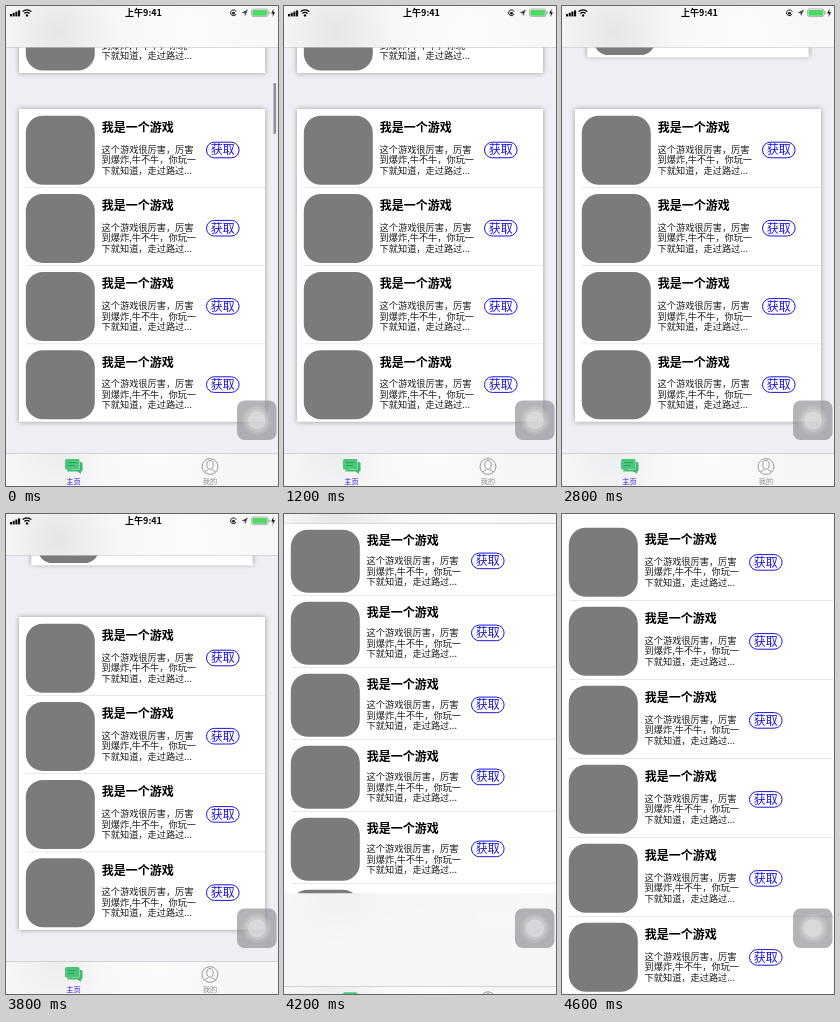
An HTML page with a canvas for the animation above (4800 ms loop, 272x480 px).

```html
<!DOCTYPE html>
<html lang="zh-CN">
<head>
<meta charset="utf-8">
<style>
html, body { margin: 0; width: 100%; height: 100%; overflow: hidden; background: #efeef4; }
canvas { display: block; width: 272px; height: 480px; }
</style>
</head>
<body>
<canvas id="stage"></canvas>
<script>
const W = 272, H = 480, LOOP = 4800, STEP = 200;
const FONT = '"Noto Sans CJK SC", "Noto Sans CJK", sans-serif';
const BLUE = '#1a12e0', ICON = '#7d7a7d', BG = '#efeef4';
const ROW = 78.2;
const BODY = ['这个游戏很厉害，厉害', '到爆炸,牛不牛，你玩一', '下就知道，走过路过...'];

const canvas = document.getElementById('stage');
const dpr = window.devicePixelRatio || 1;
canvas.width = W * dpr;
canvas.height = H * dpr;
const ctx = canvas.getContext('2d');

const lerp = (a, b, k) => a + (b - a) * k;

function rect(x, y, w, h, color) {
  ctx.fillStyle = color;
  ctx.fillRect(x, y, w, h);
}

function round(x, y, w, h, r) {
  ctx.beginPath();
  ctx.roundRect(x, y, w, h, r);
}

function disc(x, y, r, color) {
  ctx.beginPath();
  ctx.arc(x, y, r, 0, Math.PI * 2);
  ctx.fillStyle = color;
  ctx.fill();
}

function poly(points, color) {
  ctx.beginPath();
  points.forEach(([x, y]) => ctx.lineTo(x, y));
  ctx.fillStyle = color;
  ctx.fill();
}

// Soft spot of colour, given as "r,g,b", clipped to a bar.
function glow(x, y, r, rgb, alpha, top, h) {
  const g = ctx.createRadialGradient(x, y, 0, x, y, r);
  g.addColorStop(0, `rgba(${rgb},${alpha})`);
  g.addColorStop(1, `rgba(${rgb},0)`);
  rect(0, top, W, h, g);
}

function text(str, x, y, size, color, weight = 400, align = 'left') {
  ctx.font = `${weight} ${size}px ${FONT}`;
  ctx.textAlign = align;
  ctx.textBaseline = 'alphabetic';
  ctx.fillStyle = color;
  ctx.fillText(str, x, y + size * 0.37);
}

// One game entry; its contents adapt to the row height.
function drawRow(x, y, pitch, right, line) {
  const shift = (pitch - ROW) / 2;
  const iconH = Math.min(69, pitch - 9);
  ctx.fillStyle = ICON;
  round(x + 6.8, y + 6.7, 69, iconH, 17);
  ctx.fill();
  text('我是一个游戏', x + 82.7, y + 18.5 + shift * 0.2, 12, '#000', 700);
  BODY.forEach((s, i) => text(s, x + 82.6, y + 40.2 + i * 10.5 + shift * 0.8, 9.2, '#1c1c1c'));
  const mid = y + 41 + shift;
  ctx.strokeStyle = BLUE;
  ctx.lineWidth = 1;
  round(x + 187.5, mid - 7.8, 32.6, 15.6, 7.8);
  ctx.stroke();
  text('获取', x + 203.8, mid, 12, BLUE, 400, 'center');
  if (line) rect(x + 7, y + pitch, right - x - 7, 0.6, '#d9d9dc');
}

function panel(x, y, w, h) {
  ctx.save();
  ctx.shadowColor = 'rgba(0,0,0,0.36)';
  ctx.shadowBlur = 5 * dpr;
  rect(x, y, w, h, '#fff');
  ctx.restore();
}

function drawCard(top, scale) {
  const h = ROW * 4, cx = 136, cy = top + h / 2;
  ctx.save();
  ctx.translate(cx, cy);
  ctx.scale(scale, scale);
  ctx.translate(-cx, -cy);
  panel(13, top, 246, h);
  for (let i = 0; i < 4; i++) drawRow(13, top + i * ROW, ROW, 259, i < 3);
  ctx.restore();
}

function drawStatus() {
  for (let i = 0; i < 4; i++) rect(4 + i * 2.7, 8 - i * 1.2, 2, 2.4 + i * 1.2, '#000');
  ctx.strokeStyle = '#000';
  ctx.lineWidth = 1.3;
  for (const r of [3.6, 6.2]) {
    ctx.beginPath();
    ctx.arc(21, 10, r, -Math.PI * 0.75, -Math.PI * 0.25);
    ctx.stroke();
  }
  disc(21, 9.4, 1.2, '#000');
  text('上午9:41', 137.5, 7, 9, '#000', 600, 'center');

  ctx.lineWidth = 0.9;
  ctx.beginPath();
  ctx.arc(227.5, 6.8, 2.9, 0.4, 5.9);
  ctx.stroke();
  rect(226.2, 6.2, 2.6, 2.2, '#000');
  poly([[242, 3.5], [235.5, 6.8], [238.6, 7.2], [239, 10.2]], '#444');
  ctx.strokeStyle = '#888';
  ctx.lineWidth = 0.6;
  round(245.5, 3, 16.5, 7.6, 2);
  ctx.stroke();
  ctx.fillStyle = '#4cd964';
  round(246.4, 3.9, 14.7, 5.8, 1.2);
  ctx.fill();
  rect(262.5, 5.5, 1, 2.6, '#888');
  poly([[267.6, 2.8], [265.2, 7.4], [267, 7.4], [266.4, 11], [269, 6.2], [267.2, 6.2]], '#000');
}

function drawNav(offset, status) {
  ctx.save();
  ctx.translate(0, -offset);
  rect(0, 0, W, 41, '#f7f7f8');
  glow(52, 26, 60, '215,215,218', 0.55, 0, 41);
  glow(185, 24, 75, '255,255,255', 0.6, 0, 41);
  rect(0, 41, W, 0.6, '#c8c8cb');
  if (status) drawStatus();
  ctx.restore();
}

function drawTabs(offset) {
  ctx.save();
  ctx.translate(0, offset);
  rect(0, 447, W, 33, '#f6f6f8');
  glow(50, 447, 50, '228,228,231', 0.5, 447.6, 33);
  glow(150, 450, 80, '255,255,255', 0.6, 447.6, 33);
  rect(0, 447, W, 0.6, '#bcbcc0');

  ctx.fillStyle = '#3cba6e';
  round(63, 456, 13.5, 9.5, 1.5);
  ctx.fill();
  poly([[71, 465], [75, 468], [75, 465]], '#3cba6e');
  ctx.fillStyle = '#4bc67a';
  ctx.strokeStyle = '#e6f4ec';
  ctx.lineWidth = 0.8;
  round(59, 453, 14.5, 10.5, 1.5);
  ctx.stroke();
  ctx.fill();
  poly([[61.5, 463], [61.5, 466.5], [66, 463]], '#4bc67a');
  rect(62, 456.2, 8.5, 0.9, '#2a9a55');
  rect(62, 459, 6.5, 0.9, '#2a9a55');
  text('主页', 67.5, 475, 7.2, '#2416e8', 500, 'center');

  ctx.strokeStyle = '#909094';
  ctx.lineWidth = 0.9;
  ctx.beginPath();
  ctx.arc(204, 460.5, 7.9, 0, Math.PI * 2);
  ctx.stroke();
  ctx.beginPath();
  ctx.ellipse(204, 458.8, 3.2, 4.3, 0, 0, Math.PI * 2);
  ctx.stroke();
  ctx.beginPath();
  ctx.moveTo(198.4, 466);
  ctx.quadraticCurveTo(200, 464.6, 202.4, 463.6);
  ctx.moveTo(209.6, 466);
  ctx.quadraticCurveTo(208, 464.6, 205.6, 463.6);
  ctx.stroke();
  text('我的', 204, 475, 7.2, '#909094', 400, 'center');
  ctx.restore();
}

function drawAssist() {
  ctx.fillStyle = 'rgba(142,140,146,0.66)';
  round(231, 394.5, 39.5, 39.5, 7.5);
  ctx.fill();
  disc(251, 414.3, 14.5, 'rgba(255,255,255,0.13)');
  disc(251, 414.3, 11.7, 'rgba(255,255,255,0.18)');
  disc(251, 414.3, 9, 'rgba(255,255,255,0.3)');
}

function drawList(t) {
  const press = Math.min(1, Math.max(0, (t - 1700) / 300));
  rect(0, 0, W, H, BG);
  drawCard(67 - ROW * 4, 1 - 0.1 * press);
  drawCard(103, 1);
  const bar = Math.max(0, 1 - t / 600);
  if (bar > 0) {
    ctx.fillStyle = `rgba(120,120,124,${0.8 * bar})`;
    round(267.5, 77, 2.6, 51, 1.3);
    ctx.fill();
  }
}

// The pressed card grows until it fills the screen.
function drawOpen(p) {
  ctx.save();
  ctx.filter = `blur(${16 * p * dpr}px)`;
  ctx.drawImage(canvas, 0, 0, W, H);
  ctx.restore();
  ctx.globalAlpha = Math.min(0.96, p * 1.5);
  rect(0, 0, W, H, '#f7f6f8');
  ctx.globalAlpha = 1;

  const late = Math.max(0, (p - 0.765) / 0.235);
  const pitch = lerp(72, 79, late), top = lerp(9, 7, late);
  const x = 25 * Math.max(0, 1 - p / 0.7);
  const bottom = lerp(51, 480, p);
  ctx.save();
  ctx.beginPath();
  ctx.rect(x, 0, W - 2 * x, bottom);
  ctx.clip();
  rect(0, 0, W, H, '#fff');
  const first = late > 0 ? 0 : -1;
  for (let i = first; i < 7; i++) drawRow(x, top + i * pitch, pitch, W, true);
  ctx.restore();
}

function openness(t) {
  if (t < 4000) return 0;
  if (t < 4200) return 0.3;
  if (t < 4400) return 0.765;
  return t < 4600 ? 0.98 : 1;
}

function draw(now) {
  const t = Math.floor((now % LOOP) / STEP) * STEP;
  const p = openness(t);
  ctx.setTransform(dpr, 0, 0, dpr, 0, 0);
  drawList(t);
  if (p > 0) drawOpen(p);
  if (p < 0.9) {
    drawNav(42 * p, p < 0.5);
    drawTabs(33 * p);
  }
  drawAssist();
}

let start = null;
function tick(now) {
  if (start === null) start = now;
  draw(now - start);
  requestAnimationFrame(tick);
}
draw(0);
requestAnimationFrame(tick);
</script>
</body>
</html>
```
